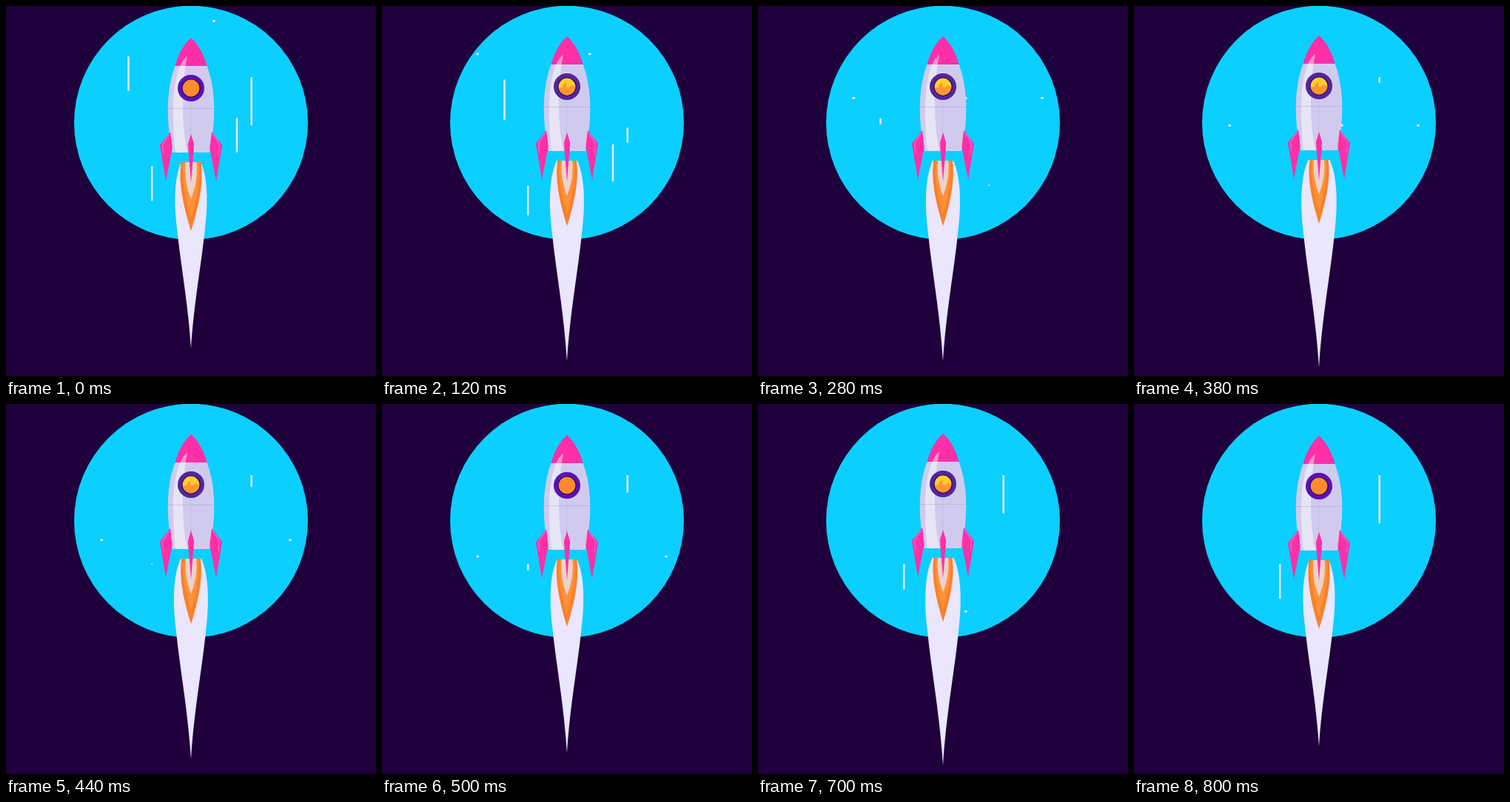
An HTML page with a canvas for the animation above (0.82 s loop, 500 by 500 pixels).

```html
<!DOCTYPE html>
<html lang="en">
<head>
<meta charset="utf-8">
<title>Rocket</title>
<style>
  html, body { margin: 0; width: 100%; height: 100%; overflow: hidden; background: #1f003c; }
  canvas { display: block; }
</style>
</head>
<body>
<canvas id="stage" width="500" height="500"></canvas>
<script>
const ctx = document.getElementById('stage').getContext('2d');
const LOOP = 820, STEP = 20, PULSE = 160;
const SKY = '#1f003c', DISC = '#0bcfff', PALE = '#eae6fd', PINK = '#ff2fa8';
const CX = 250;

// Streaks that shrink away: x, top, first head, bottom, tail start time, tail end time
const fading = [
  [165.5, 68, 115, 160, 25, 305],
  [312, 151, 198, 243, 15, 285],
  [197.2, 216, 263.5, 286, 25, 275],
  [331.7, 96, 161.5, 188, 20, 155]
];
const HEAD_STOP = 137;

// Streaks that grow until the loop ends: x, top, start time, last head
const growing = [
  [331.7, 96, 325, 161.5],
  [197.2, 216, 430, 263.5]
];
const starXs = [129.2, 280.8, 384];

const clamp = v => Math.min(1, Math.max(0, v));
const mix = (a, b, k) => a + (b - a) * clamp(k);

function fill(path, color) {
  ctx.fillStyle = color;
  ctx.fill(new Path2D(path));
}

function line(path, color, width) {
  ctx.strokeStyle = color;
  ctx.lineWidth = width;
  ctx.stroke(new Path2D(path));
}

function disc(x, y, r, color) {
  ctx.fillStyle = color;
  ctx.beginPath();
  ctx.arc(x, y, r, 0, Math.PI * 2);
  ctx.fill();
}

function group(draw) {
  ctx.save();
  draw();
  ctx.restore();
}

function mirrored(draw) {
  draw();
  group(() => {
    ctx.translate(2 * CX, 0);
    ctx.scale(-1, 1);
    draw();
  });
}

function streak(x, top, bottom) {
  if (bottom - top < 0.5) return;
  ctx.fillStyle = PALE;
  ctx.beginPath();
  ctx.roundRect(x - 1.25, top, 2.5, bottom - top, Math.min(1.2, (bottom - top) / 2));
  ctx.fill();
}

function drawSky(t) {
  ctx.fillStyle = SKY;
  ctx.fillRect(0, 0, 500, 500);
  disc(CX, 157.7, 158, DISC);
  group(() => {
    ctx.beginPath();
    ctx.arc(CX, 157.7, 158, 0, Math.PI * 2);
    ctx.clip();
    ctx.fillStyle = PALE;
    for (const x of starXs) {
      ctx.beginPath();
      ctx.ellipse(x, 20.3 + t * 0.3714, 2, 1.6, 0, 0, Math.PI * 2);
      ctx.fill();
    }
    for (const [x, top, head, bottom, from, to] of fading) {
      streak(x, mix(top, bottom, (t - from) / (to - from)), mix(head, bottom, t / HEAD_STOP));
    }
    for (const [x, top, from, head] of growing) {
      streak(x, top, mix(top, head, (t - from) / (800 - from)));
    }
  });
}

// Flames are drawn with their top centre at the origin
function drawFlame(pulse) {
  group(() => {
    ctx.translate(CX, 211 - 4 * pulse);
    group(() => {
      ctx.scale(1 + 0.14 * pulse, 1 + 0.151 * pulse);
      fill('M-13 0 C-23 21 -23 57 -19 89 C-14 139 -4 189 0 252 ' +
           'C4 189 14 139 19 89 C23 57 23 21 13 0 Z', PALE);
    });
    ctx.scale(1 - 0.1 * pulse, 1 - 0.097 * pulse);
    fill('M-13.5 0 C-16 20 -15 45 0 93 C15 45 16 20 13.5 0 Z', '#fc8029');
    fill('M-10.5 0 C-12 20 -10 42 0 76 C10 42 12 20 10.5 0 Z', '#ff9137');
    fill('M-7.5 0 C-9 16 -7 32 0 50 C7 32 9 16 7.5 0 Z', '#ecd2cb');
  });
}

function drawWindow(lit) {
  disc(CX, 111, 18, lit ? '#53259b' : '#5b10b8');
  disc(CX, 111, 12.6, '#260a55');
  disc(CX, 111, 11.4, lit ? '#ffcd2e' : '#ff8b2d');
  if (!lit) return;
  group(() => {
    ctx.beginPath();
    ctx.arc(CX, 111, 11.4, 0, Math.PI * 2);
    ctx.clip();
    fill('M238 113 L244 112 Q245 106 250 106 Q248 109 250 112 ' +
         'Q254 113 256 109 L262 112 V124 H238 Z', '#ff9630');
  });
}

function drawRocket(pulse) {
  const nose = 'M250 43 C241 51 233 64 228.5 81 H271.5 C267 64 259 51 250 43 Z';
  const body = 'M228.5 81 C217.5 110 215 150 225 198 H275 C285 150 282.5 110 271.5 81 Z';
  const hull = new Path2D(nose);
  hull.addPath(new Path2D(body));

  group(() => {
    ctx.translate(0, -4 * pulse);
    fill(body, '#d0cbee');
    fill(nose, PINK);
    group(() => {
      ctx.clip(hull);
      fill('M245 68 C232 76 226 110 226 140 C226 165 227 185 229 198 ' +
           'H245.5 C238 170 236 110 245 68 Z', 'rgba(255,255,255,.47)');
      line('M218 138.5 H282', 'rgba(120,110,180,.25)', 1);
      line('M249.5 130 V198', 'rgba(120,110,180,.18)', 1);
    });
    drawWindow(pulse > 0.4);
    mirrored(() => {
      fill('M222 170 L208 188 L216 237 L224.7 192 Z', PINK);
      line('M220.5 174 Q213 183 211.5 189 L213 201', 'rgba(255,170,220,.45)', 1.2);
    });
    fill('M250 173 L245.8 187 L250 239 L254.2 187 Z', PINK);
  });
}

function frame(now) {
  const t = Math.floor((now % LOOP) / STEP) * STEP;
  const pulse = 1 - Math.abs((t % PULSE) / (PULSE / 2) - 1);
  drawSky(t);
  drawFlame(pulse);
  drawRocket(pulse);
  requestAnimationFrame(frame);
}

requestAnimationFrame(frame);
</script>
</body>
</html>
```
